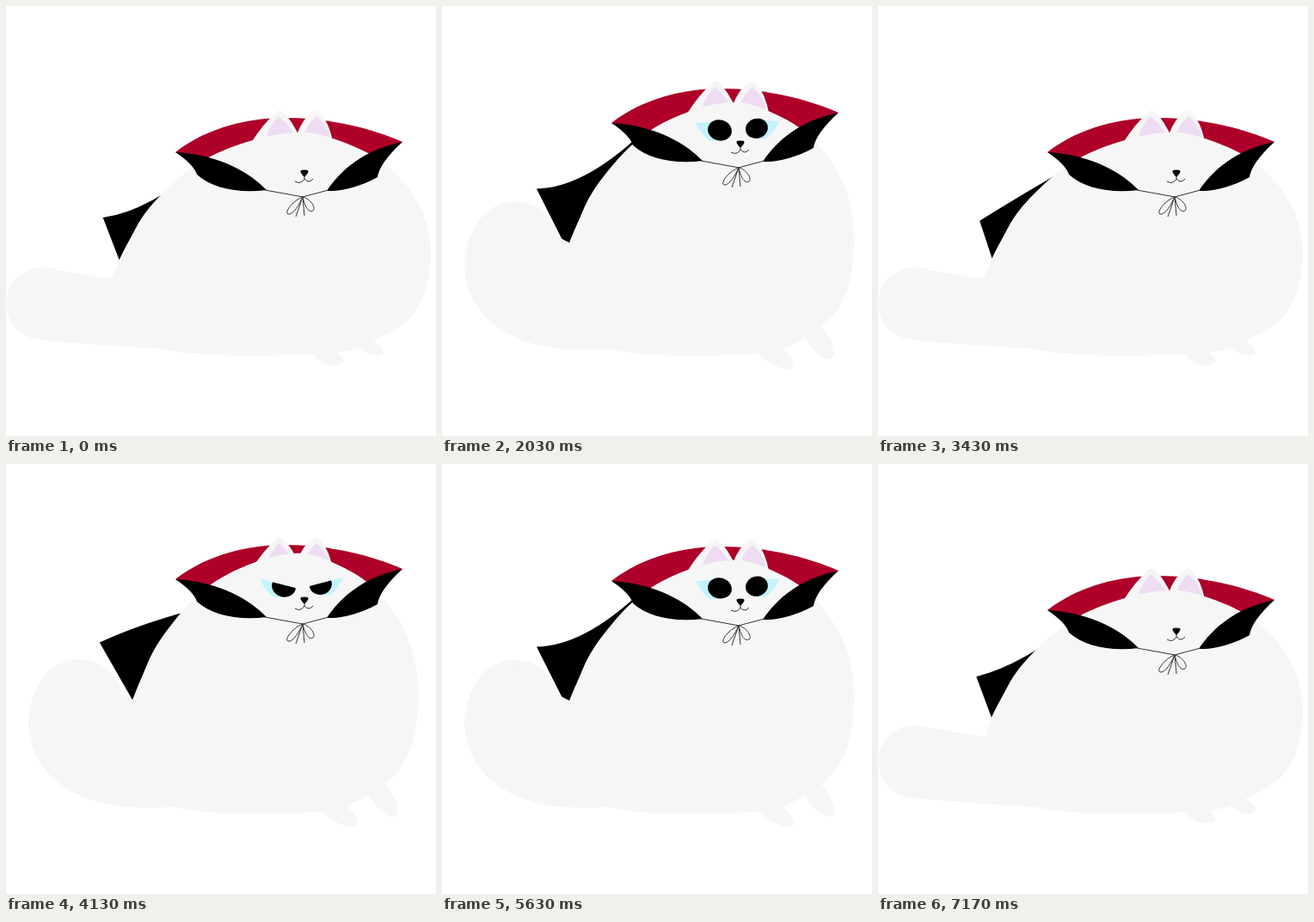
An HTML page with a canvas for the animation above (7210 ms loop, 500 by 500 pixels).

```html
<!DOCTYPE html>
<html lang="en">
<head>
<meta charset="utf-8">
<title>Caped cat</title>
<style>
  html, body { margin: 0; width: 100%; height: 100%; overflow: hidden; background: #fff; }
  canvas { display: block; width: 500px; height: 500px; }
</style>
</head>
<body>
<canvas id="stage" width="500" height="500"></canvas>
<script>
const ctx = document.getElementById('stage').getContext('2d');
const CYCLE = 7210 / 2;
const FUR = '#f6f6f6', RED = '#ae0029', PINK = '#eedcf3', CYAN = '#c3f3fd', BLACK = '#000';
const TAU = Math.PI * 2;

const ease = (t, a, b) => {
  const p = Math.min(1, Math.max(0, (t - a) / (b - a)));
  return (1 - Math.cos(Math.PI * p)) / 2;
};
const mix = (a, b, p) => a + (b - a) * p;
const bend = (a, b, c, p) => mix(mix(a, b, p), mix(b, c, p), p);

const shape = d => new Path2D(d);
const lining = shape('M197 170C235 140 285 130 325 130C375 130 425 142 461 158L420 190L340 205L235 188Z');
const ears = shape('M283 162Q300 135 316 122Q320 120 323 124Q333 134 341 152L338 175Z' +
  'M338 150Q345 130 358 122Q362 120 365 124Q376 136 380 158L350 175Z');
const innerEars = shape('M303 150Q308 138 317 128Q327 136 334 147L325 160Z' +
  'M347 149Q351 136 361 128Q371 136 377 153L355 160Z');
const flaps = shape('M197 170C250 173 285 195 303 214C270 218 240 212 222 196Q218 184 197 170Z' +
  'M461 158C415 168 390 190 373 215C395 216 420 206 432 199Q434 183 461 158Z');
const bow = shape('M301 214L345 222L375 214' +
  'M345 222C334 226 323 240 328 242C334 243 341 231 345 222' +
  'M345 222C354 224 361 235 357 238C351 241 347 231 345 222M345 222L337 245M345 222L347 244');
const nose = shape('M343 191Q347 190 351 191Q353 193 347 199Q341 193 343 191Z');
const mouth = shape('M347 198L347 201Q343 208 336 204M347 201Q352 207 357 201');
const eyeball = shape('M295 170Q310 169 322 168Q332 172 338 183Q326 192 312 191Q303 186 295 170Z');

// Body outline when crouched; it squashes and stretches about its base
const outline = [[124, 335], [150, 260], [186, 214], [232, 178], [287, 156], [338, 147], [380, 154],
  [437, 181], [480, 230], [494, 290], [478, 352], [430, 388], [360, 405], [180, 398]];

function fill(path, color) {
  ctx.fillStyle = color;
  ctx.fill(path);
}

function oval(x, y, rx, ry, turn, color) {
  ctx.beginPath();
  ctx.ellipse(x, y, rx, ry, turn, 0, TAU);
  ctx.fillStyle = color;
  ctx.fill();
}

// Closed smooth curve through all points
function blob(pts) {
  const path = new Path2D(), n = pts.length;
  path.moveTo(...pts[0]);
  pts.forEach((b, i) => {
    const a = pts[(i + n - 1) % n], c = pts[(i + 1) % n], d = pts[(i + 2) % n];
    path.bezierCurveTo(b[0] + (c[0] - a[0]) / 6, b[1] + (c[1] - a[1]) / 6,
      c[0] - (d[0] - b[0]) / 6, c[1] - (d[1] - b[1]) / 6, ...c);
  });
  return path;
}

// The tip swings four times per cycle and the upper edge ripples after it
function drawCape(t, rise, drag) {
  const phase = TAU * 4 * (t - 3385) / CYCLE;
  const x = 112.5 + 6 * Math.cos(phase) + 3.5 * rise - 10 * drag;
  const y = 246 + 4 * Math.cos(phase) + 4.5 * rise - 9 * drag;
  const sag = 5.5 + 10 * Math.sin(phase - 1);
  const endX = 232, endY = 182 + 20 * drag;
  ctx.beginPath();
  ctx.moveTo(x, y);
  ctx.quadraticCurveTo(mix(x, endX, .45), mix(y, endY, .45) + 2 * sag, endX, endY);
  ctx.lineTo(142 + 14 * rise + 4 * drag, 322 + 16 * rise - 5 * drag);
  ctx.fillStyle = BLACK;
  ctx.fill();
}

// Overlapping discs along a curve that curls up as the cat rises
function drawTail(rise) {
  const steps = 40;
  for (let i = 0; i <= steps; i++) {
    const p = i / steps;
    const x = bend(mix(42, 85, rise), mix(100, 70, rise), 190, p);
    const y = bend(mix(346, 278, rise), mix(355, 335, rise), mix(362, 345, rise), p);
    const r = mix(42 - 5 * p, 51 + 3 * p + 11 * Math.sin(Math.PI * p), rise);
    oval(x, y, r, r, 0, FUR);
  }
}

function drawBody(rise, calm) {
  const sx = 1 - .08 * rise, sy = 1 + (.167 - .03 * calm) * rise;
  fill(blob(outline.map(([x, y]) => [312 + (x - 312) * sx, 405 + (y - 405) * sy])), FUR);
}

function drawFeet(rise) {
  const foot = (from, to) => oval(...from.map((v, i) => mix(v, to[i], rise)), FUR);
  foot([376, 409, 17, 8, .25], [385, 404, 28, 11, .6]);
  foot([424, 397, 16, 8, .4], [436, 385, 30, 12, .95]);
}

function drawEye(lid) {
  ctx.save();
  ctx.beginPath();
  ctx.moveTo(285, 167 + lid);
  ctx.lineTo(348, 183 + lid);
  ctx.lineTo(348, 225);
  ctx.lineTo(285, 225);
  ctx.clip();
  fill(eyeball, CYAN);
  oval(323, 178.5, 14, 12, .25, BLACK);
  ctx.restore();
}

function drawFace(t) {
  const lid = 26 - 26 * ease(t, 130, 430) - 18 * ease(t, 800, 1300) + 44 * ease(t, 2060, 2550);
  if (lid < 25) {
    drawEye(lid);
    ctx.save();
    ctx.translate(352 + 338 * .93, 5);
    ctx.scale(-.93, .96);
    drawEye(lid);
    ctx.restore();
  }
  fill(nose, BLACK);
  ctx.stroke(mouth);
}

function shifted(dy, paint) {
  ctx.save();
  ctx.translate(0, dy);
  paint();
  ctx.restore();
}

function draw(t) {
  const rise = ease(t, 0, 480) - ease(t, 1980, 2870);
  const calm = ease(t, 700, 1900);
  const lift = (1.7 * calm - 36) * rise;

  ctx.fillStyle = '#fff';
  ctx.fillRect(0, 0, 500, 500);
  shifted(lift, () => {
    drawCape(t, rise, rise * (1 - calm));
    fill(lining, RED);
    fill(ears, FUR);
    fill(innerEars, PINK);
  });
  drawTail(rise);
  drawBody(rise, calm);
  drawFeet(rise);
  shifted(lift, () => {
    fill(flaps, BLACK);
    ctx.strokeStyle = '#333';
    ctx.lineWidth = 1;
    ctx.stroke(bow);
    drawFace(t);
  });
}

const start = performance.now();
function tick() {
  draw((performance.now() - start) % CYCLE);
  requestAnimationFrame(tick);
}
tick();
</script>
</body>
</html>
```
